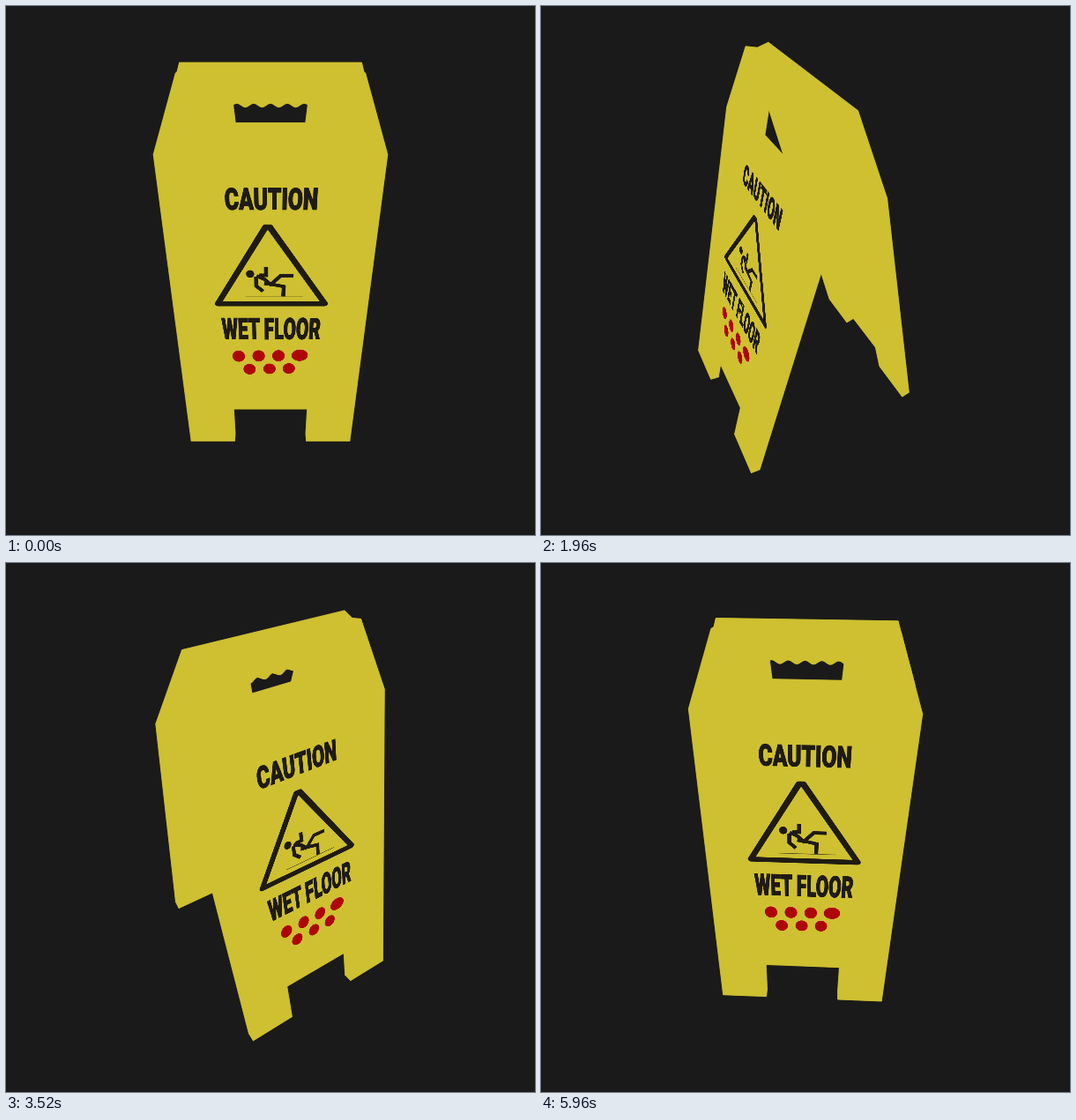
Recreate the animation shown at these times as an HTML page with a canvas. Size 600 by 600 pixels, loop 6000 ms.

```html
<!DOCTYPE html>
<html lang="en">
<head>
<meta charset="utf-8">
<title>Wet floor sign</title>
<style>
  html, body { margin: 0; width: 100%; height: 100%; overflow: hidden; background: #1a1a1a; }
  canvas, svg { position: absolute; left: 0; top: 0; display: block; }
  svg { transform-origin: 0 0; }
  text { font: 900 15.5px Roboto, "Open Sans", sans-serif; text-anchor: middle; stroke-width: .5; }
  .ink { fill: #1f1b14; stroke: #1f1b14; }
  .line { fill: none; stroke: #1f1b14; }
</style>
</head>
<body>
<canvas width="600" height="600"></canvas>
<svg width="400" height="1200" viewBox="-50 0 100 300">
  <text class="ink" transform="translate(.6 91.2) scale(1 1.45)">CAUTION</text>
  <path class="line" stroke-width="4.8" stroke-linejoin="round" d="M-43 174.2L-3.8 105.5H-.4L44.4 174.2Z"/>
  <ellipse class="ink" stroke="none" cx="-16" cy="145.8" rx="3.2" ry="3.5" stroke-width="0"/>
  <path class="line" stroke-width="3.2" d="M-11 147.5L-5 150.5L1 156.5M-11.3 148.5V157L-6 162M-3.5 139.4V147H-9
    M-5 154.5L4 156L10.6 157.5L10.3 167M0 156L8 147.3H18.2"/>
  <path class="line" stroke-width=".6" stroke-opacity=".7" d="M-19.8 167.4H26"/>
  <text class="ink" transform="translate(.7 211) scale(1 2)">WET FLOOR</text>
  <g fill="#ae0509">
    <ellipse cx="-27.9" cy="230.2" rx="5.5" ry="6.5"/>
    <ellipse cx="-10.4" cy="229.9" rx="5.5" ry="6.5"/>
    <ellipse cx="7" cy="229.7" rx="5.5" ry="6.5"/>
    <ellipse cx="25.6" cy="229.2" rx="7.2" ry="6.6"/>
    <ellipse cx="-18.7" cy="245.4" rx="5.5" ry="6.3"/>
    <ellipse cx="-.9" cy="245" rx="5.5" ry="6.3"/>
    <ellipse cx="16.4" cy="244.6" rx="5.5" ry="6.3"/>
  </g>
</svg>
<script>
const LOOP = 6000, STEP = 40;
const FOCAL = 519.6, TILT = Math.SQRT1_2;      // 60 degree lens looking down at 45 degrees
const K = TILT / FOCAL;
const THICK = 8.8, DOWN = 0.9693, OUT = 0.2459; // board thickness and slope
const ctx = document.querySelector('canvas').getContext('2d');
const art = document.querySelector('svg');
const artBack = art.cloneNode(true);
document.body.append(artBack);

// Board shapes: u runs across, v down from the top edge.
const outline = [[-59, 0], [59, 0], [79.4, 51], [79.4, 341.5], [36, 341.5], [36, 296],
  [-36, 296], [-36, 341.5], [-79.4, 341.5], [-79.4, 51]];
const grip = [[26, 49.5], [-26, 49.5]];
for (let i = 0; i <= 40; i++) grip.push([-27 + i * 1.35, 19 + 1.2 * Math.cos(i * Math.PI / 4)]);

let cos = 1, sin = 0;

// Homogeneous screen position of a board point; side is 1 or -1.
function hom(side, u, v, depth = 0) {
  const x = side * u;
  const y = 331 - DOWN * v - OUT * depth;
  const z = side * (8.6 + OUT * v - DOWN * depth) - 7.3;
  const X = x * cos + z * sin, Z = z * cos - x * sin;
  const w = 1 - K * (Z + y);
  return [300 * w + X, 410.6 + (TILT - 300 * K) * Z - (TILT + 300 * K) * y, w];
}

function project(loop, side, depth) {
  return loop.map(([u, v]) => {
    const [x, y, w] = hom(side, u, v, depth);
    return [x / w, y / w];
  });
}

function fill(...loops) {
  ctx.beginPath();
  for (const loop of loops) {
    loop.forEach(p => ctx.lineTo(...p));
    ctx.closePath();
    ctx.moveTo(...(loops.at(-1)[0]));
  }
  ctx.fill('evenodd');
  ctx.stroke();
}

function drawBoard(side) {
  const outer = [outline, grip].map(l => project(l, side, 0));
  const inner = [outline, grip].map(l => project(l, side, THICK));
  fill(...outer);
  fill(...inner);
  outer.forEach((a, n) => {
    const b = inner[n];
    a.forEach((p, i) => {
      const j = (i + 1) % a.length;
      fill([p, a[j], b[j], b[i]]);
    });
  });
}

function placeArt(el, side) {
  const o = hom(side, -50, 0);
  const step = p => p.map((n, i) => (n - o[i]) / 4);
  const a = step(hom(side, -49, 0)), b = step(hom(side, -50, 1));
  const facing = a[0] * (b[1] * o[2] - b[2] * o[1])
    - a[1] * (b[0] * o[2] - b[2] * o[0])
    + a[2] * (b[0] * o[1] - b[1] * o[0]);
  el.style.visibility = facing > 0 ? 'visible' : 'hidden';
  const col = ([x, y, w]) => [x, y, 0, w].map(n => n.toFixed(8));
  el.style.transform = `matrix3d(${[...col(a), ...col(b), 0, 0, 1, 0, ...col(o)]})`;
}

function draw(ms) {
  const angle = Math.floor(ms % LOOP / STEP) * STEP / LOOP * 2 * Math.PI;
  cos = Math.cos(angle);
  sin = Math.sin(angle);
  ctx.fillStyle = '#1a1a1a';
  ctx.fillRect(0, 0, 600, 600);
  ctx.fillStyle = ctx.strokeStyle = '#cec030';
  ctx.lineWidth = 0.6;
  ctx.lineJoin = 'round';
  drawBoard(1);
  drawBoard(-1);
  placeArt(art, 1);
  placeArt(artBack, -1);
}

const start = performance.now();
function tick() {
  draw(performance.now() - start);
  requestAnimationFrame(tick);
}
tick();
</script>
</body>
</html>
```
